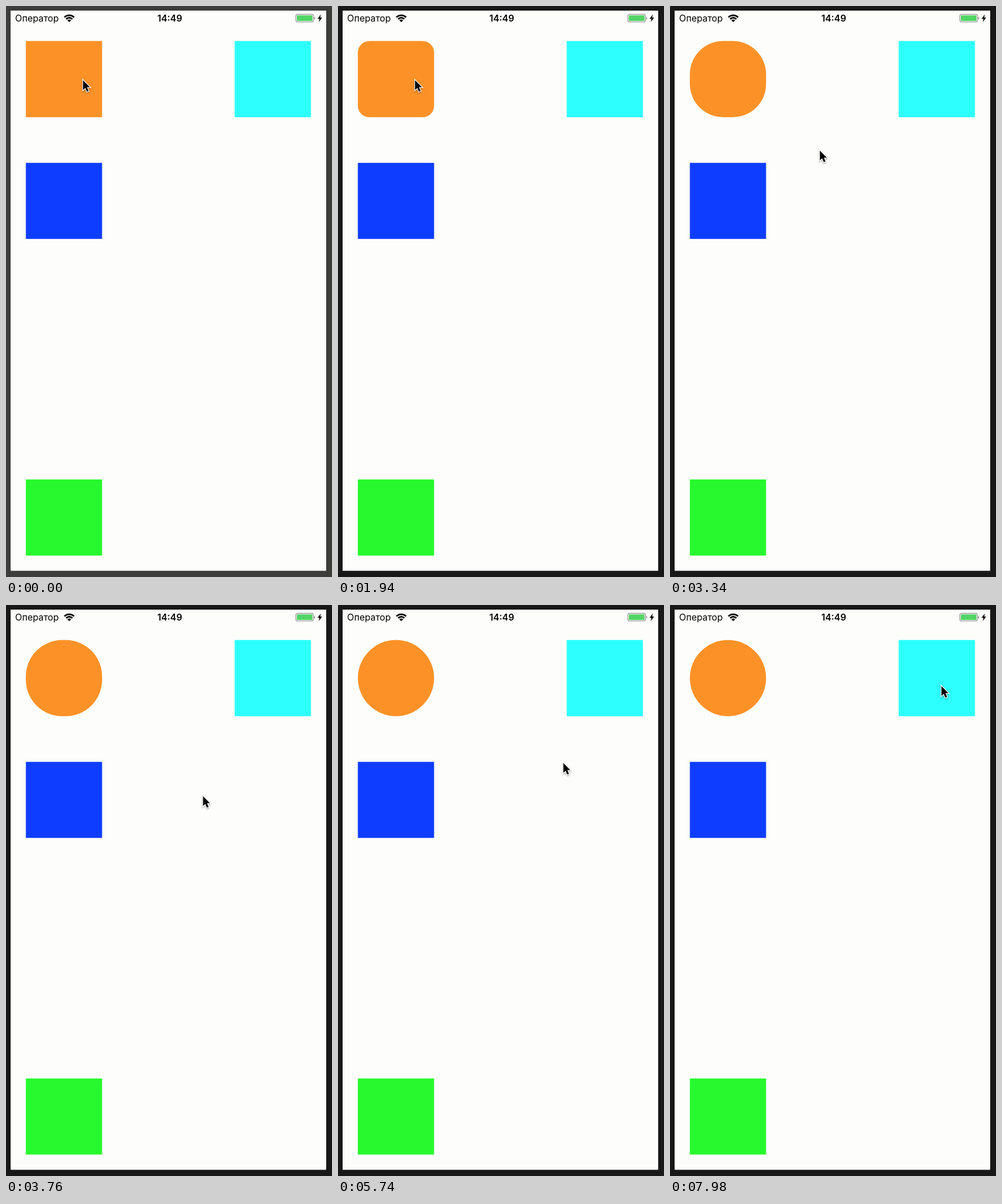
Animation of 565 by 991 pixels, one loop 8000 ms. Source, as an HTML page with a canvas:

```html
<!DOCTYPE html>
<html lang="ru">
<head>
<meta charset="utf-8">
<title>Corner radius</title>
<style>
  html, body { margin: 0; width: 100%; height: 100%; overflow: hidden; background: #3d3d3c; }
  canvas { display: block; }
</style>
</head>
<body>
<canvas id="stage" width="565" height="991"></canvas>
<script>
const ctx = document.getElementById('stage').getContext('2d');
const LOOP = 8000;
const FOCUS_AT = 1200;
const ROUND = { start: 1465, length: 2920 };

// The phone screen is laid out in points
const EDGE = 8, PT = 1.321;
const SCREEN = { w: 414, h: 736 };
const SIDE = 100, MARGIN = 20;

// Pointer stops; it eases from one to the next
const STOPS = [
  { t: 2450, x: 133, y: 128 },
  { t: 2820, x: 146, y: 138 },
  { t: 3760, x: 341, y: 331 },
  { t: 4780, x: 353, y: 330 },
  { t: 5400, x: 355, y: 329 },
  { t: 6320, x: 468, y: 150 },
  { t: 7980, x: 470, y: 140 }
];

const clamp = v => Math.min(1, Math.max(0, v));
const mix = (a, b, k) => a + (b - a) * k;
const smooth = p => p * p * (3 - 2 * p);
const easeOut = p => 1 - (1 - p) ** 2;

function box(x, y, w, h, color, r = 0) {
  ctx.fillStyle = color;
  ctx.beginPath();
  ctx.roundRect(x, y, w, h, r);
  ctx.fill();
}

function tile(x, y, color, r = 0) {
  box(EDGE + x * PT, EDGE + y * PT, SIDE * PT, SIDE * PT, color, r * PT);
}

function label(text, x, weight, align) {
  ctx.font = `${weight} ${12 * PT}px Inter, sans-serif`;
  ctx.textAlign = align;
  ctx.fillStyle = '#000';
  ctx.fillText(text, x, 27.2);
}

function wifi(x, y) {
  const from = -Math.PI * 0.75, to = -Math.PI * 0.25;
  ctx.fillStyle = '#000';
  for (let i = 0; i < 3; i++) {
    const outer = 4.6 + 4.35 * i;
    ctx.beginPath();
    ctx.arc(x, y, outer, from, to);
    ctx.arc(x, y, i ? outer - 2.8 : 0, to, from, true);
    ctx.fill();
  }
}

function battery() {
  ctx.strokeStyle = '#9b9b9b';
  ctx.lineWidth = 1.3;
  ctx.beginPath();
  ctx.roundRect(502.3, 14.5, 30.6, 13.2, 3);
  ctx.stroke();
  box(504, 16.2, 27.2, 9.8, '#53d566', 1.3);
  box(534, 19, 1.8, 4.4, '#9b9b9b', [0, 2, 2, 0]);
}

function bolt(x, y) {
  ctx.fillStyle = '#000';
  ctx.beginPath();
  for (const s of [1, -1]) {
    ctx.lineTo(x + 1.8 * s, y - 6.8 * s);
    ctx.lineTo(x - 3.9 * s, y + 1.1 * s);
    ctx.lineTo(x - 0.6 * s, y + 1.1 * s);
  }
  ctx.fill();
}

function pointerAt(t) {
  let { x, y } = STOPS[0];
  for (let i = 1; i < STOPS.length; i++) {
    const a = STOPS[i - 1], b = STOPS[i];
    const k = smooth(clamp((t - a.t) / (b.t - a.t)));
    if (k > 0) [x, y] = [mix(a.x, b.x, k), mix(a.y, b.y, k)];
  }
  return [x, y];
}

function pointer(x, y) {
  const arrow = new Path2D('M0 0V17L3.9 13.4L6.7 20L9.7 18.8L6.9 12.3H12Z');
  ctx.save();
  ctx.translate(x + 0.5, y + 0.8);
  ctx.shadowColor = 'rgba(0,0,0,0.35)';
  ctx.shadowBlur = 3;
  ctx.shadowOffsetY = 1.5;
  ctx.strokeStyle = '#fff';
  ctx.lineWidth = 2.4;
  ctx.stroke(arrow);
  ctx.shadowColor = 'transparent';
  ctx.fillStyle = '#000';
  ctx.fill(arrow);
  ctx.restore();
}

function draw(t) {
  const far = SCREEN.w - MARGIN - SIDE;
  const low = SCREEN.h - MARGIN - SIDE;
  const rounding = easeOut(clamp((t - ROUND.start) / ROUND.length));

  box(0, 0, 565, 991, t < FOCUS_AT ? '#3d3d3c' : '#181818');
  box(EDGE, EDGE, SCREEN.w * PT, SCREEN.h * PT, '#fdfdfc');
  label('Оператор', 15.8, 400, 'left');
  label('14:49', 283.8, 600, 'center');
  wifi(109.6, 28);
  battery();
  bolt(543.9, 21.2);
  tile(MARGIN, 40, '#fc9227', rounding * SIDE / 2);
  tile(far, 40, '#2dffff');
  tile(MARGIN, 200, '#0f3dff');
  tile(MARGIN, low, '#27f92e');
  pointer(...pointerAt(t));
}

const began = performance.now();
function tick() {
  draw((performance.now() - began) % LOOP);
  requestAnimationFrame(tick);
}
tick();
</script>
</body>
</html>
```
